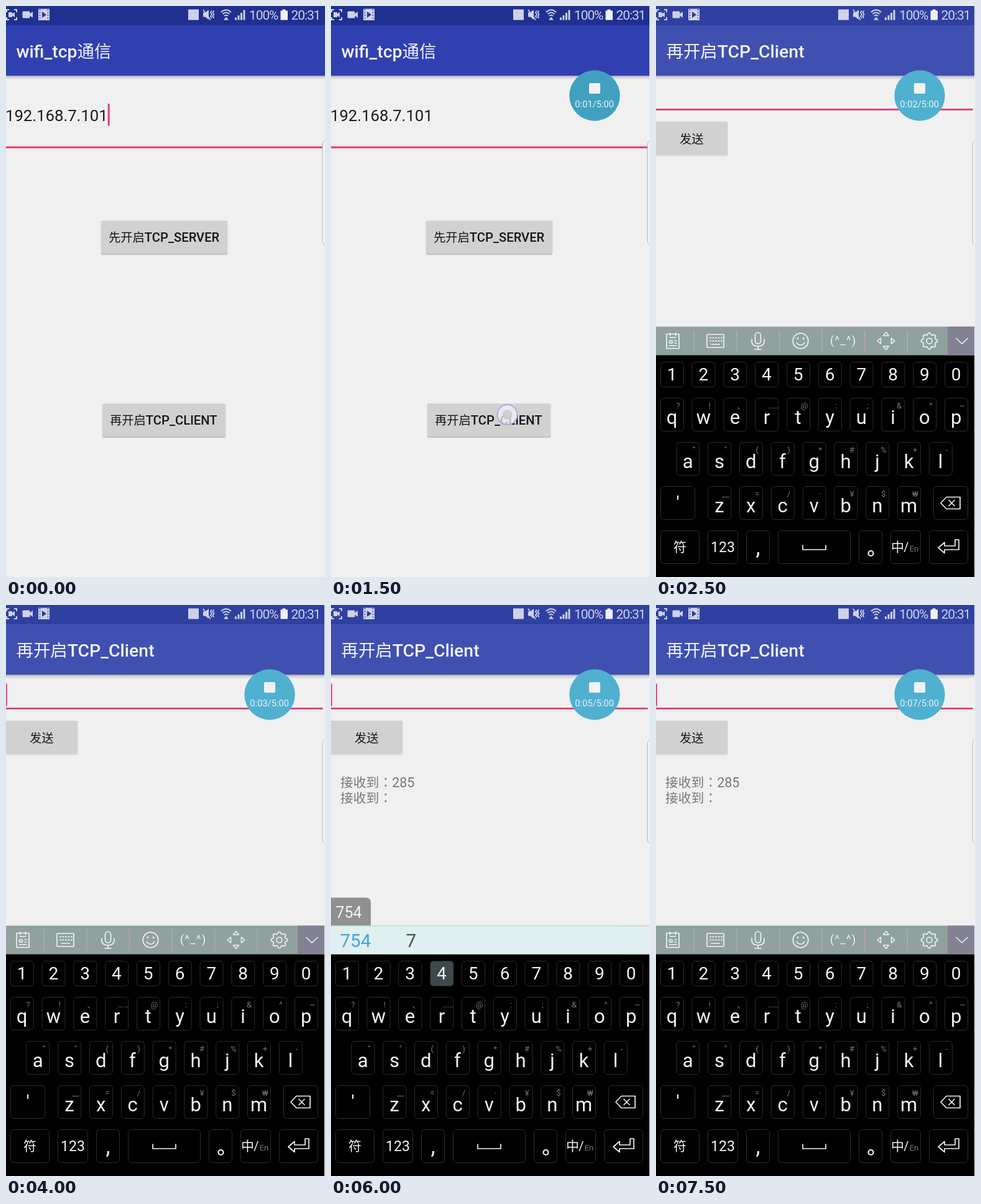
Animation, 513 px wide and 918 px high, one loop 8000 ms. Source, as an HTML page:

```html
<!DOCTYPE html>
<html lang="zh-CN">
<head>
<meta charset="utf-8">
<title>wifi_tcp</title>
<style>
  html, body { margin: 0; width: 100%; height: 100%; overflow: hidden; background: #f0f0f0; }
  svg { display: block; font-family: Roboto, "Noto Sans CJK SC", "Noto Sans CJK", sans-serif; }
  .cjk { font-family: "Noto Sans CJK SC", "Noto Sans CJK", sans-serif; font-weight: 400; }
  .colon { font-family: "Noto Sans CJK TC", "Noto Sans CJK", sans-serif; }
  .title { font-size: 28.4px; font-weight: 500; fill: #f2f2f8; }
  .title .cjk { font-size: 27.4px; }
  .label { font-size: 20.2px; font-weight: 500; fill: #161616; }
  .label .cjk { font-size: 19.3px; }
  .got { font-size: 21.4px; fill: #787878; }
  .got .cjk, .got .colon { font-size: 20.8px; }
  .clock { font-size: 21px; letter-spacing: -1.1px; }
  .mid { text-anchor: middle; }
  .line { fill: none; stroke: #f2f2f2; stroke-width: 1.7; stroke-linecap: round; stroke-linejoin: round; }
  .pink { fill: #e23d78; }
  .off { display: none; }
  .key { fill: #000; stroke: #2c2c2c; stroke-width: 1; }
  .hint { font-size: 13px; fill: #777; }
  .glyph { fill: #f4f4f4; }
</style>
</head>
<body>
<svg width="513" height="918" viewBox="0 0 513 918">
  <defs>
    <linearGradient id="drop" x1="0" y1="0" x2="0" y2="1">
      <stop offset="0" stop-color="#a8a8b0"/>
      <stop offset=".45" stop-color="#d2d2d4"/>
      <stop offset="1" stop-color="#e9e9e9"/>
    </linearGradient>
  </defs>
  <rect width="513" height="918" fill="#f0f0f0"/>

  <!-- first screen -->
  <g id="main" data-on="0-4">
    <rect width="540" height="112" fill="#3040b0"/>
    <rect y="112" width="540" height="6" fill="url(#drop)"/>
    <text class="title" x="16.5" y="83">wifi_tcp<tspan class="cjk">通信</tspan></text>
    <text x="-1" y="185" font-size="25.7" fill="#1c1c1c">192.168.7.101</text>
    <rect class="pink" y="225.7" width="509" height="3"/>
    <rect class="pink" x="163.7" y="157" width="3" height="35.5" data-on="0,2"/>
    <g data-button="153 345 203" fill="#b8b8b8"></g>
    <text class="label" x="165" y="379"><tspan class="cjk">先开启</tspan>TCP_SERVER</text>
    <g data-button="155 639 198" fill="#b8b8b8"></g>
    <text class="label" x="167" y="673"><tspan class="cjk">再开启</tspan>TCP_CLIENT</text>
    <g data-on="3">
      <circle cx="283.5" cy="657" r="16" fill="#f4f4fa" fill-opacity=".72" stroke="#a9b0dc" stroke-width="2"/>
      <circle cx="283.5" cy="657" r="8" fill="#c9c9cc" fill-opacity=".8"/>
    </g>
  </g>
  <rect width="50" height="918" fill="#000" opacity=".13" data-on="4"/>

  <!-- second screen -->
  <g id="client" data-on="4-15">
    <rect x="-7" width="520" height="918" fill="#f0f0f0"/>
    <rect id="bar" x="-7" width="520" height="112"/>
    <rect x="-7" y="112" width="520" height="6" fill="url(#drop)"/>
    <text class="title" x="16.5" y="83"><tspan class="cjk">再开启</tspan>TCP_Client</text>
    <rect class="pink" x="-1" y="165" width="510.5" height="2.8"/>
    <rect class="pink" x="-1" y="126.5" width="2.8" height="36" data-on="4,6,8,10,12,13,15"/>
    <g data-button="-2 186 117" fill="#dadada"></g>
    <text class="label" x="38" y="220.5"><tspan class="cjk">发送</tspan></text>
    <g data-on="13">
      <rect x="-2" y="185" width="118" height="57" rx="4" fill="none" stroke="#d6d6da" stroke-width="2"/>
      <path d="M0 239.500H110" stroke="#bcbcbc" stroke-width="1.500"/>
      <circle cx="59" cy="203" r="26.5" fill="#000" opacity=".1"/>
      <circle cx="59.5" cy="201" r="16" fill="#e4e4ea" fill-opacity=".45" stroke="#bfc2d4" stroke-width="1.5"/>
    </g>
    <g class="got" data-on="9-15">
      <text x="15" y="292.5"><tspan class="cjk">接收到</tspan><tspan class="colon" lang="zh-TW">：</tspan>285</text>
      <text x="15" y="318"><tspan class="cjk">接收到</tspan><tspan class="colon" lang="zh-TW">：</tspan></text>
    </g>
  </g>

  <!-- status bar -->
  <rect id="status" width="513" height="31"/>
  <g fill="#ced2e8">
    <path d="M1 5H5V7H2V10H0V5ZM13 5H18V10H16V7H13ZM16 18H18V23H13V21H16ZM0 18H2V21H5V23H0ZM4 10H10V12.5L14 10V18L10 15.5V18H4Z"/>
    <path d="M28 8.5H37Q38.500 8.500 38.500 10V12.500L43 9V19L38.500 15.500V18Q38.500 19.500 37 19.500H28Q26.500 19.500 26.500 18V10Q26.500 8.500 28 8.500Z"/>
    <rect x="52" y="4.500" width="18" height="18.500" rx="1"/>
    <rect x="293" y="5.500" width="17" height="17"/>
    <path d="M317 10.500H320.500L326 6V22L320.500 17.500H317Z"/>
    <path d="M354 17.500L358 22.500H350Z"/>
    <path d="M368 18.500h3v4h-3zM372.500 15h3v7.500h-3zM377 11h3v11.500h-3zM381.500 6.500h3v16h-3z"/>
    <path d="M444.500 5.500H449.500V7.500H453V22.500H441.500V7.500H444.500Z" fill="#f0f1f8"/>
    <g class="clock">
      <text x="391" y="22">100%</text>
      <text x="458.500" y="22">20:31</text>
    </g>
  </g>
  <g fill="none" stroke="#ced2e8" stroke-width="2">
    <path d="M317 6L329 22.500M331 7.500l-2 3 2 3-2 3 2 3M334.500 7.500l-2 3 2 3-2 3 2 3" stroke-width="1.700"/>
    <path d="M346 10Q354 2.500 362 10M348.500 13Q354 8 359.500 13M351 16Q354 13.500 357 16"/>
    <path d="M54.500 5V23M67.500 5V23" stroke="#2a3a98" stroke-width="1.400" stroke-dasharray="2 2.500"/>
    <path d="M58 9L65 14L58 19Z" fill="#2a3a98" stroke="none"/>
  </g>

  <path d="M514 215Q509 218 509 224V376Q509 382 514 385" fill="#f5f5f5" stroke="#b0b0b0"/>

  <!-- recorder bubble -->
  <g id="bubble" data-on="1-15">
    <circle id="disc" cx="424" cy="144" r="40.700"/>
    <rect x="415" y="124" width="18" height="17" rx="2" fill="#f2f2f2"/>
    <text id="count" class="mid" x="423.700" y="162.500" font-size="14.700" fill="#eaf4f8"></text>
  </g>

  <!-- keyboard -->
  <g data-on="5-15">
    <rect y="561" width="513" height="357"/>
    <g id="keys"></g>
    <rect y="515.500" width="513" height="46" fill="#90a1a0"/>
    <rect x="469" y="515.500" width="44" height="46" fill="#828292"/>
    <path id="seps" stroke="#b9a9b4" stroke-width="1.500"/>
    <g class="line">
      <path d="M17 527.500H37V550.500H17ZM22.500 525.500V530M31.500 525.500V530M22.500 533H31.500M21.500 538H26V542H21.500ZM30 538H33M30 542H33M21.500 546H33"/>
      <rect x="82" y="528" width="27" height="21" rx="1"/>
      <path d="M87 533.500H106M87 538.500H106" stroke-dasharray="1 3.500" stroke-width="2.200"/>
      <path d="M89 544H102"/>
      <rect x="159.500" y="525" width="9" height="18" rx="4.500"/>
      <path d="M154 536V539Q154 547 164 547T174 539V536M164 547V552M159 552H169"/>
      <circle cx="232.500" cy="538.500" r="12.300"/>
      <path d="M226 541.500Q232.500 549 239 541.500"/>
      <path d="M228 534.500h.1M237 534.500h.1" stroke-width="3"/>
      <path d="M365.500 530L370 524.500L374.500 530ZM365.500 547L370 552.500L374.500 547ZM361.500 534V543L356 538.500ZM378.500 534V543L384 538.500Z" stroke-width="1.500"/>
      <path id="gear"/>
      <circle cx="439.500" cy="538.500" r="4.500"/>
      <path d="M483 534.500L492 543L501 534.500"/>
    </g>
    <text class="mid" x="301" y="544" font-size="19" letter-spacing="1" fill="#f2f2f2">(^_^)</text>
    <g data-on="12,13">
      <path d="M0 470.500H56Q64 470.500 64 478.500V516H0Z" fill="#909090"/>
      <text x="7.500" y="503" font-size="25" fill="#f4f4f4">754</text>
      <rect y="515.500" width="513" height="46" fill="#e0efef"/>
      <path d="M0 515.800H513" stroke="#c4cccc"/>
      <text x="14.500" y="550" font-size="29.500" fill="#45a5ce">754</text>
      <text x="120.500" y="550" font-size="29.500" fill="#4c4c4c">7</text>
    </g>
  </g>

  <rect x="512" width="1" height="918" fill="#f0f0f0" data-on="1-15"/>
</svg>
<script>
  const $ = id => document.getElementById(id);
  const LOOP = 8000, STEP = 500, PITCH = 50.8;

  // Raised buttons: "x y width", the group's fill is the lower edge
  for (const g of document.querySelectorAll('[data-button]')) {
    const [x, y, w] = g.dataset.button.split(' ').map(Number);
    const box = (dx, dy, h, fill = '') =>
      `<rect x="${x - dx}" y="${y + dy}" width="${w + 2 * dx}" height="${h}" rx="3.5" ${fill && `fill="${fill}"`}/>`;
    g.innerHTML = box(1, 0, 55.5, '#e0e0e0') + box(0, 1, 53.8) + box(0, 0, 53.3, '#d1d1d1');
  }

  // Keyboard
  const escape = s => s.replace(/&/g, '&amp;');
  const text = (s, x, y, size, cls = 'glyph') =>
    `<text class="mid ${cls}" x="${x}" y="${y}" font-size="${size}">${escape(s)}</text>`;
  const frame = (x, y, w, h, extra = '') =>
    `<rect class="key" x="${x + .5}" y="${y + .5}" width="${w - 1}" height="${h - 1}" rx="5" ${extra}/>`;

  function keyRow(chars, hints, x0, y, h, size, base) {
    return [...chars].map((c, i) => {
      const x = x0 + i * PITCH, mid = x + 18.7;
      return frame(x, y, 38, h) + text(c, mid, y + base, size) +
        (hints[i] ? text(hints[i], mid + 10, y + 17, 13, 'hint') : '');
    }).join('');
  }

  const wide = [[7, 772, 56], [446, 772, 56], [7, 843, 63], [83, 843, 49], [145, 843, 38],
    [196, 843, 117], [326, 843, 38], [377, 843, 49], [439, 843, 63]];

  $('keys').innerHTML =
    keyRow('1234567890', [], 6.8, 572, 41, 28, 30) +
    keyRow('qwertyuiop', ['?', '!', '、', '……', '@', ':', ';', '&', '^', '~'], 6.8, 630, 54, 31, 42) +
    keyRow('asdfghjkl', [...'“"()*#%+-'], 32.4, 701, 54, 31, 42) +
    keyRow('zxcvbnm', ['__', ...'=/·¥$₩'], 83.2, 772, 54, 31, 42) +
    wide.map(([x, y, w]) => frame(x, y, w, 54)).join('') +
    text("'", 35, 809, 30) + text('符', 38.5, 877, 21, 'glyph cjk') +
    text('123', 107.5, 878, 23) + text(',', 164, 882, 36) +
    text('中', 388.5, 877, 21, 'glyph cjk') + text('/', 402.5, 877, 20) +
    text('En', 415, 877, 14.5, 'hint') +
    `<g class="line">
      <circle cx="345.500" cy="880" r="4" stroke-width="2.200"/>
      <path d="M236 867V874H273V867"/>
      <path d="M458 799L467 789.500H489V808.500H467ZM471 794.500L480 803.500M480 794.500L471 803.500"/>
      <path d="M454 871L464 862.500V868H481V858H487V874H464V879.500Z"/>
    </g>` +
    `<g data-on="12">${frame(7 + 3 * PITCH, 572, 38, 41, 'style="fill:#3c4a4c"')}${text('4', 25.5 + 3 * PITCH, 602, 28)}</g>`;

  $('seps').setAttribute('d', Array.from({ length: 6 }, (_, i) => `M${61.3 + i * 68.6} 521V556`).join(''));

  // Eight soft teeth
  $('gear').setAttribute('d', 'M' + Array.from({ length: 64 }, (_, i) => {
    const a = i * Math.PI / 32, r = 11.6 + 1.5 * Math.tanh(2 * Math.cos(8 * a));
    return `${(439.5 + r * Math.cos(a)).toFixed(1)} ${(538.5 + r * Math.sin(a)).toFixed(1)}`;
  }).join('L') + 'Z');

  // data-on lists the half-second steps in which a part shows
  const parts = [...document.querySelectorAll('[data-on]')].map(el => ({
    el,
    spans: el.dataset.on.split(',').map(s => s.split('-').map(Number))
  }));

  function draw(step) {
    for (const { el, spans } of parts)
      el.classList.toggle('off', !spans.some(([a, b = a]) => step >= a && step <= b));

    const sliding = step === 4, typing = step > 4;
    $('main').setAttribute('transform', `translate(${sliding ? -16 : 0})`);
    $('client').setAttribute('transform', `translate(${sliding ? 57 : 0})`);
    $('bubble').setAttribute('transform', `translate(0 ${step === 1 ? -50 : 0})`);
    $('status').setAttribute('fill', typing ? '#3040a0' : '#203090');
    $('bar').setAttribute('fill', typing ? '#4050b0' : '#3040b0');
    $('disc').setAttribute('fill', typing ? '#50b0d0' : '#41a0c0');
    $('count').textContent = `0:0${Math.max(0, Math.floor((step - 1) / 2))}/5:00`;
  }

  let shown = -1;
  function tick() {
    const step = Math.floor(performance.now() % LOOP / STEP);
    if (step !== shown) draw(shown = step);
    requestAnimationFrame(tick);
  }
  tick();
</script>
</body>
</html>
```
